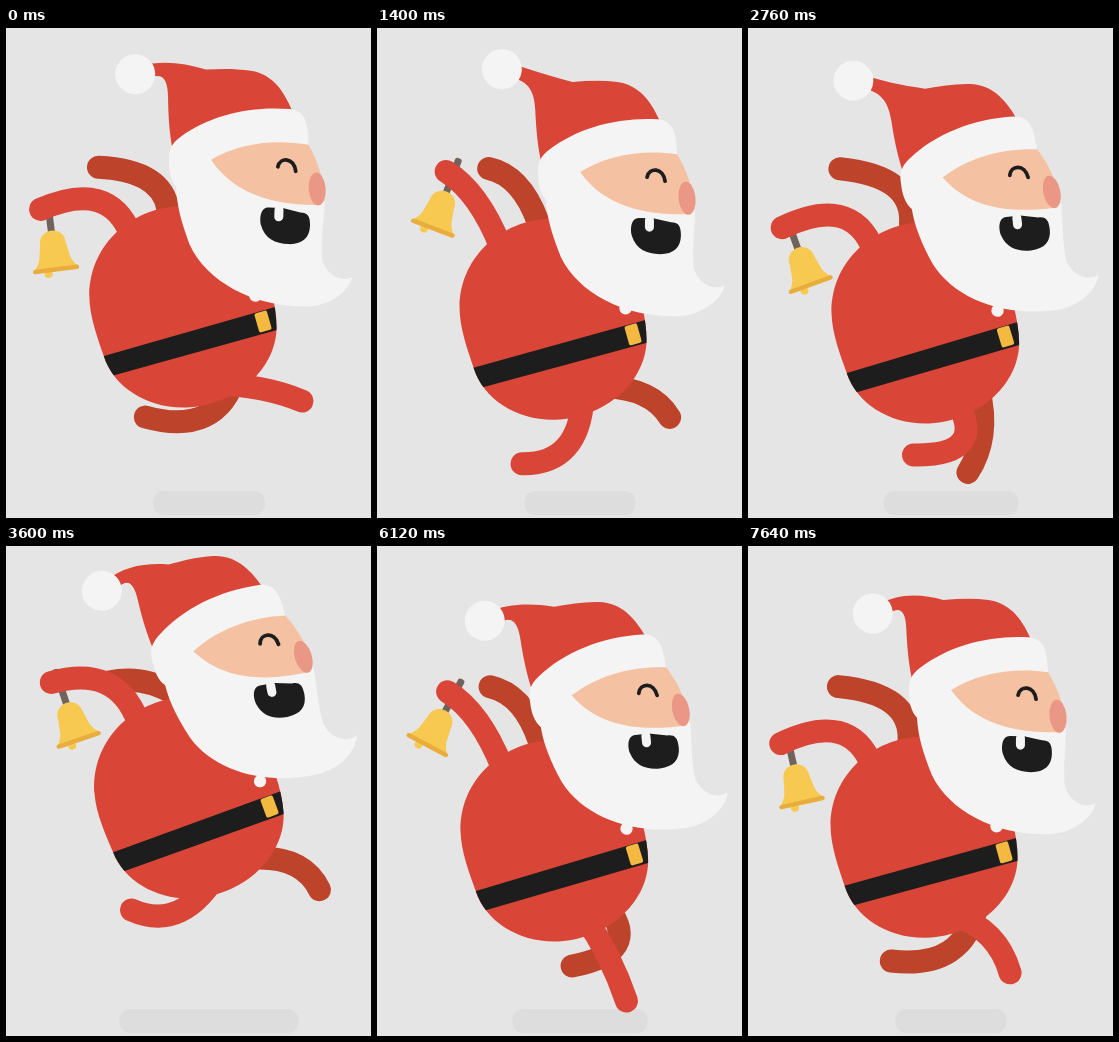
Recreate the animation shown at these times as an HTML page with a canvas. Size 365x490 px, loop 7.68 s.

```html
<!DOCTYPE html>
<html lang="en">
<head>
<meta charset="utf-8">
<title>Running Santa</title>
<style>
html, body { margin: 0; width: 100%; height: 100%; overflow: hidden; background: #e5e5e5; }
canvas { display: block; width: 365px; height: 490px; }
</style>
</head>
<body>
<canvas id="stage"></canvas>
<script>
const W = 365, H = 490, LOOP = 7680, STRIDE = 960, STEP = 480, TICK = 40;
const PAPER = '#e5e5e5', SHADE = '#dddddd';
const RED = '#d94638', DARK = '#bd432b', WHITE = '#f4f4f4', BLACK = '#1e1d1d';
const SKIN = '#f4c2a3', NOSE = '#ea9786', GOLD = '#f7c951', BRIM = '#e8ad3c', GREY = '#6f635b';

const canvas = document.getElementById('stage');
const ctx = canvas.getContext('2d');
const ratio = window.devicePixelRatio || 1;
canvas.width = W * ratio;
canvas.height = H * ratio;

// One stride, shared by both legs: time, knee, foot (from the belt buckle).
const stride = [
  [0, 1, 64, 39, 80],
  [270, 12, 58, 46, 92],
  [360, -24, 100, -8, 147],
  [440, -54, 131, -111, 130],
  [500, -64, 128, -121, 104],
  [720, -86, 127, -138, 104],
  [840, -16, 120, -92, 119],
  [920, -6, 78, 6, 121]
];

// Smooth periodic interpolation without overshoot.
function sample(keys, time, period) {
  const n = keys.length, t = time % period;
  let i = n - 1;
  while (keys[i][0] > t) i--;
  const at = k => keys[(k + n) % n];
  const when = k => at(k)[0] + Math.floor(k / n) * period;
  const secant = (k, c) => (at(k + 1)[c] - at(k)[c]) / (when(k + 1) - when(k));
  const slope = (k, c) => {
    const a = secant(k - 1, c), b = secant(k, c);
    return a * b <= 0 ? 0 : 2 * a * b / (a + b);
  };
  const h = when(i + 1) - when(i), u = (t - when(i)) / h, v = 1 - u;
  return at(i).slice(1).map((p, j) => {
    const c = j + 1, q = at(i + 1)[c];
    return p * v * v * (1 + 2 * u) + q * u * u * (1 + 2 * v)
      + h * u * v * (v * slope(i, c) - u * slope(i + 1, c));
  });
}

const rad = deg => deg * Math.PI / 180;
const turnAt = (t, period) => 2 * Math.PI * t / period;

// First two harmonics of one step.
function wave(t, mean, c1, s1, c2 = 0, s2 = 0) {
  const a = turnAt(t, STEP);
  return mean + c1 * Math.cos(a) + s1 * Math.sin(a) + c2 * Math.cos(2 * a) + s2 * Math.sin(2 * a);
}

function fill(shape, color) {
  ctx.fillStyle = color;
  ctx.fill(typeof shape === 'string' ? new Path2D(shape) : shape);
}

function stroke(d, color, width) {
  ctx.strokeStyle = color;
  ctx.lineWidth = width;
  ctx.lineCap = 'round';
  ctx.stroke(new Path2D(d));
}

function oval(x, y, rx, ry, color, turn = 0) {
  const p = new Path2D();
  p.ellipse(x, y, rx, ry, rad(turn), 0, 7);
  fill(p, color);
}

function box(x, y, w, h, r, color) {
  const p = new Path2D();
  p.roundRect(x, y, w, h, r);
  fill(p, color);
}

// Draw inside a moved and turned frame.
function placed(x, y, turn, draw) {
  ctx.save();
  ctx.translate(x, y);
  ctx.rotate(rad(turn));
  draw();
  ctx.restore();
}

function limb(x, y, bendX, bendY, endX, endY, color) {
  stroke(`M${x} ${y} Q${bendX} ${bendY} ${endX} ${endY}`, color, 23);
}

function drawNearLeg(t) {
  const [kx, ky, fx, fy] = sample(stride, t, STRIDE);
  limb(-50, 63, kx, ky, fx, fy, RED);
}

// The far leg runs half a stride apart, slightly early and shifted by depth.
function drawFarLeg(t) {
  const [kx, ky, fx, fy] = sample(stride, t + STRIDE / 2 + 26, STRIDE);
  limb(-27, 53, kx + 20, ky - 12, fx + 4, fy - 8, DARK);
}

// The far arm sinks when the body jumps.
function drawFarArm(swing, drag) {
  placed(-95, -112, 0, () =>
    limb(0, 0, -11 - 10 * swing - 0.6 * drag, -43 + 0.6 * drag, -60 + 11 * swing, -48 + 0.9 * drag, DARK));
}

function drawBellArm(t) {
  const a = turnAt(t - 400, STRIDE);
  const lift = 34 + 21 * Math.cos(a);
  const x = -94 * Math.cos(rad(lift)), y = -94 * Math.sin(rad(lift));
  placed(-132, -86, 0, () => {
    placed(x + 8, y, lift - 30 - 14 * Math.sin(a), drawBell);
    limb(0, 0, -22, -56, x, y, RED);
  });
}

function drawBell() {
  box(-3.5, -14, 7, 38, 2.5, GREY);
  oval(-8, 64, 4, 4, GOLD);
  fill('M-13 35 C-13 17 13 17 13 35 L15.5 49 Q17 54 22 60 H-22 Q-17 54 -15.5 49Z', GOLD);
  stroke('M-21 60.5 H21', BRIM, 4.5);
}

function drawBody() {
  const shape = new Path2D('M168 191 C120 195 82 232 82 280 C82 300 90 322 96 340 C106 372 140 393 178 392 ' +
    'C230 390 269 352 269 312 C269 290 262 262 250 235 C235 205 205 189 168 191Z');
  ctx.translate(-255.5, -306);
  fill(shape, RED);
  ctx.save();
  ctx.clip(shape);
  fill('M76 345.5 L288 286.5 V310 L76 367.5Z', BLACK);
  ctx.restore();
  placed(255.5, 306.5, -15.6, () => box(-6.5, -10, 13, 20, 2, '#f3b941'));
  oval(248, 280.5, 6.2, 6.2, WHITE);
}

function drawHat(t) {
  const x = 124.5, y = 57 - 19 * Math.cos(turnAt(t, 640) - rad(102));
  const bend = (y - 47) * 0.2;
  fill(`M164 134 C161 120 159 105 158 82 C157 62 150 ${53 + bend} ${x + 6} ${y + 8} L${x + 4} ${y - 8} ` +
    `C150 ${43 + bend} 172 48 195 54 C210 53 225 52 240 54 C263 57 275 75 284 96 L230 120Z`, RED);
  oval(x, y, 20, 20, WHITE);
}

function drawHead(t) {
  ctx.translate(-279, -208);
  drawHat(t);
  fill('M161 146 C160 135 164 128 172 122 C200 100 240 89 280 91 C296 92 299 104 300 127 L313 165 L318 184 ' +
    'C318 200 315 220 317 240 C322 255 335 263 348 257 C343 276 320 288 300 288 C249 289 202 266 184 229 ' +
    'C175 207 170 190 169 172 C163 166 161 156 161 146Z', WHITE);
  fill('M203 144 C230 127 265 121 300 126 C306 136 313 150 315 165 L314 186 C275 187 230 182 203 144Z', SKIN);
  oval(310, 170, 8.5, 16.5, NOSE, -6);
  stroke('M270 149 C272 139 286 139 288 153', BLACK, 3.8);
  fill('M262 190 C254 190 253 201 255 208 C259 221 270 226 283 226 C297 226 304 219 304 207 ' +
    'C304 197 301 194 294 194 L276 190Z', BLACK);
  stroke('M272.5 192 V199', WHITE, 9);
}

function draw(t) {
  ctx.setTransform(ratio, 0, 0, ratio, 0, 0);
  ctx.fillStyle = PAPER;
  ctx.fillRect(0, 0, W, H);

  const shade = wave(t, 145.5, -33.5, 10.5);
  box(203 - shade / 2, 463, shade, 24, 11, SHADE);

  const x = wave(t, 260.25, -3.25, 2.75);
  const y = wave(t, 280, 16.5, -24.5, -3.5, -1.2);
  placed(x, y, 0, () => {
    drawFarArm(Math.cos(turnAt(t - 400, STRIDE)), 300 - y);
    drawFarLeg(t);
    drawNearLeg(t);
  });
  placed(x, y, wave(t, -2.45, 2.05, -1.35), drawBody);
  placed(x, y, 0, () => drawBellArm(t));
  placed(wave(t, 276.5, 2.5, -0.5), wave(t, 179.5, 22, -22, -3.5, -0.4),
    wave(t, -4.5, 6.3, 1.6), () => drawHead(t));
}

const start = performance.now();
function frame() {
  const t = Math.max(0, performance.now() - start) % LOOP;
  draw(Math.floor(t / TICK) * TICK);
  requestAnimationFrame(frame);
}
frame();
</script>
</body>
</html>
```
